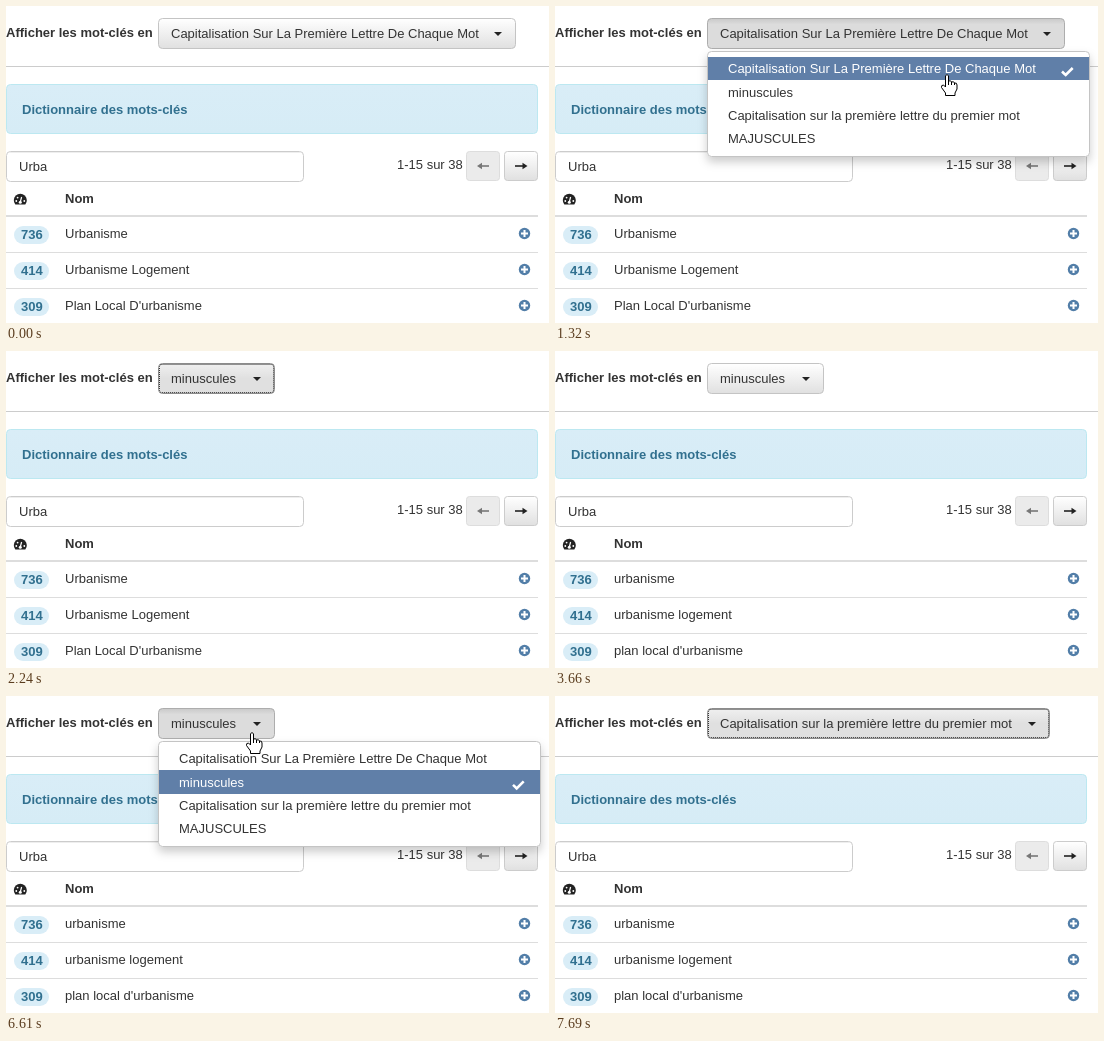
Animation of 543x317 px, one loop 8 s. Source, as an HTML page:

```html
<!DOCTYPE html>
<html lang="fr">
<head>
<meta charset="utf-8">
<title>Dictionnaire des mots-clés</title>
<style>
html, body { margin: 0; width: 100%; height: 100%; overflow: hidden; background: #fff; }
svg { display: block; }
text { font: 13px "Liberation Sans", Arial, sans-serif; fill: #333; white-space: pre; }
.b { font-weight: bold; }
.info { fill: #31708f; }
</style>
</head>
<body>
<svg id="stage" width="543" height="317" viewBox="0 0 543 317">
  <defs>
    <linearGradient id="normal" x2="0" y2="1"><stop stop-color="#fff"/><stop offset="1" stop-color="#e0e0e0"/></linearGradient>
    <linearGradient id="hover" x2="0" y2="1"><stop stop-color="#f0f0f0"/><stop offset=".5" stop-color="#e0e0e0"/></linearGradient>
    <linearGradient id="pressed" x2="0" y2="1"><stop stop-color="#c9c9c9"/><stop offset=".2" stop-color="#dcdcdc"/></linearGradient>
    <linearGradient id="panel" x2="0" y2="1"><stop stop-color="#d9edf7"/><stop offset="1" stop-color="#d6ecf6"/></linearGradient>
    <filter id="shadow" x="-10%" y="-20%" width="120%" height="150%">
      <feDropShadow dx="0" dy="5" stdDeviation="5" flood-color="#000" flood-opacity=".2"/>
    </filter>
  </defs>

  <text class="b" x="0" y="31">Afficher les mot-clés en</text>
  <path d="M0 60.5H543" stroke="#ccc"/>
  <rect x=".5" y="78.5" width="531" height="49" rx="4" fill="url(#panel)" stroke="#bce8f1"/>
  <text class="b info" x="16" y="108">Dictionnaire des mots-clés</text>

  <rect x=".5" y="145.5" width="297" height="30" rx="4" fill="#fff" stroke="#ccc"/>
  <path d="M3 146.5H295" stroke="#eee"/>
  <text x="13" y="165">Urba</text>
  <text x="391" y="163">1-15 sur 38</text>
  <rect x="460.5" y="145.5" width="33" height="29" rx="3" fill="#ebebeb" stroke="#ddd"/>
  <path d="M474 160H483" stroke="#777" stroke-width="1.6"/>
  <path d="M471 160l5-3.2v6.4z" fill="#777"/>
  <rect x="498.5" y="145.5" width="33" height="29" rx="3" fill="url(#normal)" stroke="#ccc"/>
  <path d="M509 160H518" stroke="#222" stroke-width="1.6"/>
  <path d="M521.500 160l-5-3.200v6.400z" fill="#222"/>

  <path d="M9.300 198.500A6.500 6.500 0 1 1 19.300 198.500Z" fill="#222"/>
  <path d="M14.300 196L15.600 191" stroke="#fff" stroke-width="1.200"/>
  <g fill="#fff">
    <circle cx="10.300" cy="195" r=".9"/><circle cx="11.600" cy="191.600" r=".9"/>
    <circle cx="18.300" cy="195" r=".9"/><circle cx="14.300" cy="196.300" r="1.500"/>
  </g>
  <text class="b" x="59" y="197">Nom</text>
  <path d="M0 210H532" stroke="#ddd" stroke-width="2"/>
  <g id="rows"></g>

  <g id="button">
    <rect id="face" x="152.5" y="12.5" height="30" rx="4"/>
    <rect id="ring" x="153.5" y="13.5" height="28" rx="2" fill="none" stroke="#333" stroke-dasharray="1 1"/>
    <text id="label" x="165" y="32"></text>
    <path id="caret" d="M-4 26H4L0 30Z" fill="#222"/>
  </g>
  <g id="menu">
    <rect x="152.500" y="45.500" width="382" height="105" rx="4" fill="#fff" stroke="#c4c4c4" filter="url(#shadow)"/>
    <rect id="bar" x="153" width="381" fill="#607fa8"/>
    <g id="items"></g>
    <path id="check" d="M507 65.500l3.700 3.500 7-7" fill="none" stroke-width="2.600"/>
  </g>
  <g id="cursor" fill="#fff" stroke="#000" stroke-linejoin="round">
    <path id="arrow" d="M0 0V16L3.700 12.500 6.200 18.300 8.600 17.200 6.100 11.600H11Z"/>
    <path id="hand" d="M-1.500 1.700Q0-.5 1.500 1.700V7Q4 6 4.500 8 7 7 7.500 9 10 8.500 10 11V15L8 19V21.500H-1.500V19L-5.500 13.500Q-6 11-3.500 11L-1.500 13ZM1.500 7V11M4.500 8V11M7.500 9V11"/>
  </g>
</svg>
<script>
const LOOP = 8000;
const $ = id => document.getElementById(id);
const set = (el, attrs) => { for (const k in attrs) el.setAttribute(k, attrs[k]); };
const show = (el, on) => { el.style.display = on ? '' : 'none'; };
const add = (parent, tag, attrs, text = '') => {
  const el = document.createElementNS('http://www.w3.org/2000/svg', tag);
  set(el, attrs);
  el.textContent = text;
  parent.appendChild(el);
  return el;
};

const options = [
  { text: 'Capitalisation Sur La Première Lettre De Chaque Mot', width: 358 },
  { text: 'minuscules', width: 117 },
  { text: 'Capitalisation sur la première lettre du premier mot', width: 343 },
  { text: 'MAJUSCULES', width: 0 }
];
const itemTop = i => Math.round(51 + 23.4 * i);
const items = options.map((o, i) =>
  add($('items'), 'text', { x: 173, y: Math.round(67.2 + 23.4 * i) }, o.text));

const words = [[736, 'Urbanisme'], [414, 'Urbanisme Logement'], [309, "Plan Local D'urbanisme"]];
const names = words.map(([count, name], i) => {
  const y = 36 * i, g = $('rows');
  if (i) add(g, 'path', { d: `M0 ${210.5 + y}H532`, stroke: '#ddd' });
  add(g, 'rect', { x: 8, y: 220 + y, width: 35, height: 18, rx: 9, fill: '#d9edf7' });
  add(g, 'text', { class: 'b info', x: 15, y: 233 + y }, count);
  add(g, 'circle', { cx: 518.5, cy: 227.5 + y, r: 5.7, fill: '#527ea8' });
  add(g, 'path', { d: `M515 ${227.5 + y}h7m-3.5-3.5v7`, stroke: '#fff', 'stroke-width': 2 });
  return add(g, 'text', { x: 59, y: 232 + y }, name);
});

// Pointer moves: start, end, steps, from x, y, to x, y
const moves = [
  [80, 310, 4, 470, 46, 464, 36],
  [540, 860, 5, 462, 36, 447, 36],
  [1160, 1320, 3, 447, 36, 392, 68],
  [1420, 1420, 1, 385, 72, 385, 72],
  [1630, 2165, 8, 376, 74, 215, 86],
  [6000, 6460, 7, 540, 35, 246, 36],
  [6760, 6990, 4, 245, 44, 240, 86],
  [7070, 7380, 5, 244, 90, 268, 108],
  [7530, 7610, 2, 270, 108, 272, 107]
];
const within = (t, a, b) => t >= a && t < b;

function pointer(t) {
  if (!within(t, 80, 2240) && !within(t, 6000, 7690)) return null;
  const [t0, t1, n, x0, y0, x1, y1] = moves.filter(m => m[0] <= t).pop();
  const gaps = n - 1 || 1;
  const step = Math.min(gaps, Math.floor((t - t0) / (t1 - t0 || 1) * gaps + 1e-6));
  const u = step / gaps, e = u * (2 - u);
  return { x: x0 + (x1 - x0) * e, y: y0 + (y1 - y0) * e };
}

function render(t) {
  const chosen = t < 2240 ? 0 : t < 7690 ? 1 : 2;
  const open = within(t, 1160, 2240) || within(t, 6610, 7690);
  const focus = within(t, 2240, 3340) || t >= 7690;
  const { text, width } = options[chosen];
  const p = pointer(t);
  const onButton = !!p && p.x > 152 && p.x < 152 + width && p.y > 12 && p.y < 43;
  const onMenu = !!p && open && p.y >= 51 && p.y < 145;

  const fill = open ? 'pressed' : onButton || focus ? 'hover' : 'normal';
  set($('face'), {
    width: width - 1,
    fill: `url(#${fill})`,
    stroke: focus ? '#8c8c8c' : open || onButton ? '#adadad' : '#c4c4c4'
  });
  set($('ring'), { width: width - 3 });
  show($('ring'), focus);
  $('label').textContent = text;
  set($('caret'), { transform: `translate(${152 + width - 18})` });

  show($('menu'), open);
  const active = onMenu ? Math.floor((p.y - 51) / 23.4) : chosen;
  set($('bar'), { y: itemTop(active), height: itemTop(active + 1) - itemTop(active) });
  items.forEach((el, i) => { el.style.fill = i === active ? '#fff' : '#333'; });
  set($('check'), {
    transform: `translate(0 ${23.4 * chosen})`,
    stroke: active === chosen ? '#fff' : '#333'
  });

  names.forEach((el, i) => {
    const name = words[i][1];
    el.textContent = t < 3660 ? name : name.toLowerCase();
  });

  show($('cursor'), p);
  if (p) {
    const hand = onButton || onMenu;
    show($('hand'), hand);
    show($('arrow'), !hand);
    set($('cursor'), { transform: `translate(${Math.round(p.x)} ${Math.round(p.y)})` });
  }
}

const start = performance.now();
function tick() {
  render((performance.now() - start) % LOOP);
  requestAnimationFrame(tick);
}
render(0);
requestAnimationFrame(tick);
</script>
</body>
</html>
```
